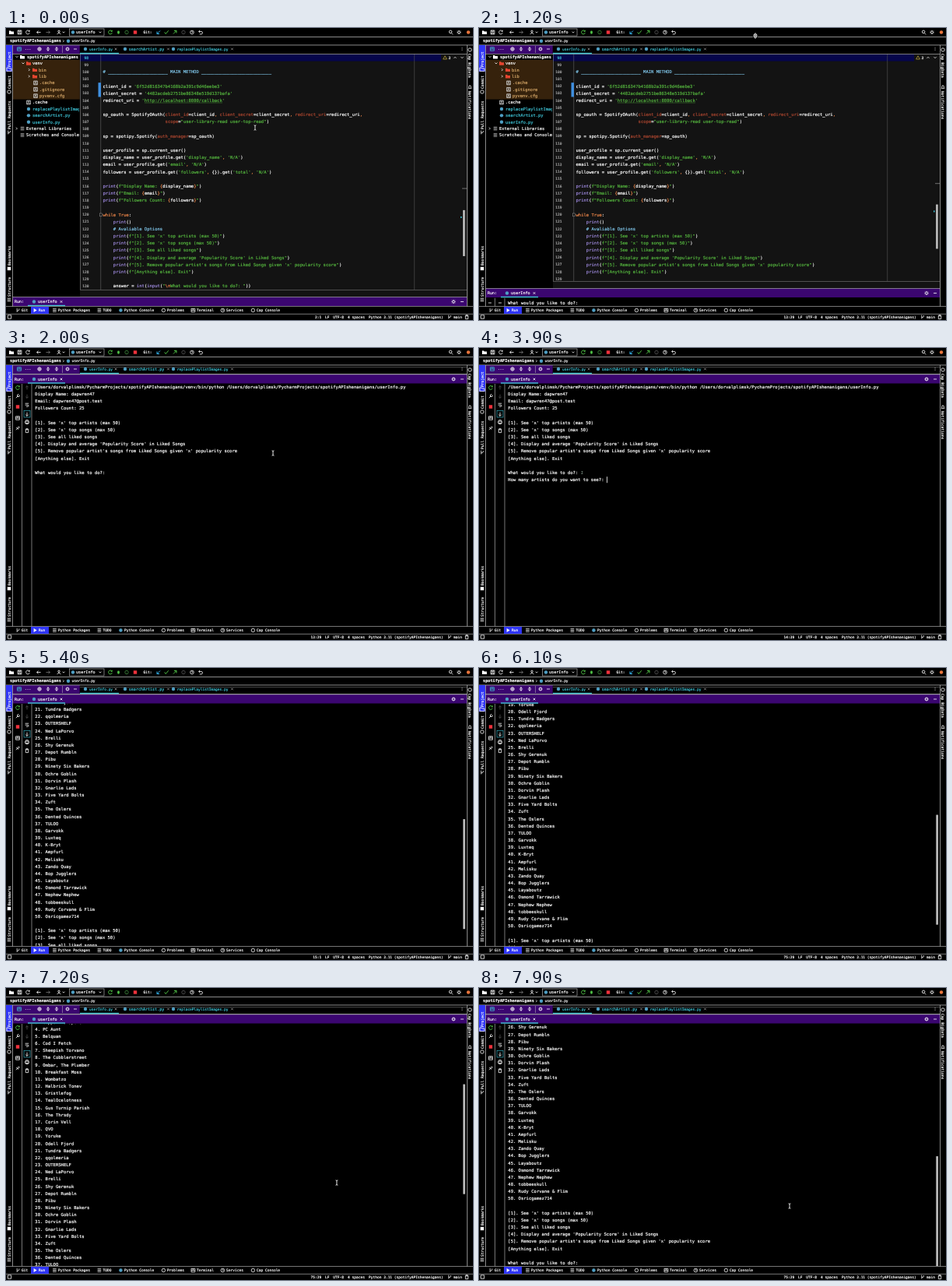
Animation of 600 by 375 pixels, one loop 8000 ms. Source, as an HTML page with a canvas:

```html
<!DOCTYPE html>
<html lang="en">
<head>
<meta charset="utf-8">
<title>Console session</title>
<style>
html, body { margin: 0; height: 100%; overflow: hidden; background: #000; }
canvas { display: block; width: 100vw; height: 100vh; }
</style>
</head>
<body>
<canvas id="stage"></canvas>
<script>
const W = 600, H = 375, LOOP = 8000, ROW = 9.17, CH = 3.336, UI = 2.75;
const WHITE = '#fff', EDGE = '#c4c4c4', CYAN = '#3fc4d6', GREEN = '#4fbf45', RED = '#f0323c', BLUE = '#2f35f5';
const PURPLE = '#3b0670', PAPER = '#131313', STRING = '#54b33e', ORANGE = '#ed864a';
const stage = document.getElementById('stage'), g = stage.getContext('2d');
const scale = Math.max(1, devicePixelRatio || 1);
stage.width = W * scale;
stage.height = H * scale;

const CODE_START = 98;
const CODE = `

# ${'_'.repeat(23)} MAIN METHOD ${'_'.repeat(27)}

client_id = '6f52d816347b4168b2a391c9d46eebe3'
client_secret = '4482acdeb2751be86348e519d137bafa'
redirect_uri = 'http://localhost:8080/callback'

sp_oauth = SpotifyOAuth(client_id=client_id, client_secret=client_secret, redirect_uri=redirect_uri,
                        scope="user-library-read user-top-read")

sp = spotipy.Spotify(auth_manager=sp_oauth)

user_profile = sp.current_user()
display_name = user_profile.get('display_name', 'N/A')
email = user_profile.get('email', 'N/A')
followers = user_profile.get('followers', {}).get('total', 'N/A')

print(f"Display Name: {display_name}")
print(f"Email: {email}")
print(f"Followers Count: {followers}")

while True:
    print()
    # Avaliable Options
    print(f"[1]. See 'x' top artists (max 50)")
    print(f"[2]. See 'x' top songs (max 50)")
    print(f"[3]. See all liked songs")
    print(f"[4]. Display and average 'Popularity Score' in Liked Songs")
    print(f"[5]. Remove popular artist's songs from Liked Songs given 'x' popularity score")
    print(f"[Anything else]. Exit")

    answer = int(input("\\nWhat would you like to do?: "))`.split('\n');

const PROJECT = '/Users/dorvalplimsk/PycharmProjects/spotifyAPIshenanigans';
const ASK = 'What would you like to do?: ', COUNT = 'How many artists do you want to see?: ';
const MENU = ['', "[1]. See 'x' top artists (max 50)", "[2]. See 'x' top songs (max 50)", '[3]. See all liked songs',
  "[4]. Display and average 'Popularity Score' in Liked Songs",
  "[5]. Remove popular artist's songs from Liked Songs given 'x' popularity score", '[Anything else]. Exit', '', ASK];
const INTRO = [`${PROJECT}/venv/bin/python ${PROJECT}/userInfo.py`, 'Display Name: dapwren47',
  'Email: dapwren47@post.test', 'Followers Count: 25', ...MENU];
const ARTISTS = `Paper Sextants|Oblong Harbor|Copper Parapets|PC Aunt|Belquan|Cod I Fetch|Sheepish Torvano|The Cobblerstreet|Ombar, The Plumber|Breakfast Moss|Wombatzo|Halbrick Tonev|Gristlefog|TealOcelotness|Gus Turnip Parish|The Thrsdy|Corin Vell|QVO|Yoruke|Odell Fjord|Tundra Badgers|qqolmeria|OUTERSHELF|Ned LaPorvo|Brelli|Shy Gerenuk|Depot Rumbln|Pibu|Ninety Six Bakers|Ochre Goblin|Dorvin Plash|Gnarlie Lads|Five Yard Bolts|Zuft|The Oslers|Dented Quinces|TULOO|Garvokk|Luxteq|K-Bryt|Ampfurl|Melisku|Zando Quay|Bop Jugglers|Layaboutz|Osmond Tarrawick|Nephew Nephew|tobbeeskull|Rudy Corvane & Flim|Osricgamez714`
  .split('|').map((name, i) => `${i + 1}. ${name}`);

// Times of the session, in ms
const READY = 700, PICK = 3100, PICKED = 3500, FIVE = 4200, ZERO = 4400, SENT = 4900, LISTED = 5400;
const CARET_RESETS = [0, READY, 1400, PICK, PICKED, FIVE, ZERO, SENT, LISTED];
const PANEL = [[1000, 345.5], [1200, 334.5], [1290, 334.5], [1300, 34]];
const SCROLL = [[5400, 327], [5490, 327], [5500, 375.5], [5900, 375.5], [6600, 164], [6900, 130], [7100, 130], [7700, 375.5]];
const MOUSE = [[100, 320, 128], [900, 355, 346], [1000, 355, 346], [1200, 355, 10], [1500, 355, 10],
  [2000, 343, 135], [2400, 360, 150], [2700, 372, 158]];
const MOUSE_BACK = [[7200, 425, 250], [7800, 399, 280]];

function at(keys, t) {
  const n = keys.findIndex(k => k[0] > t);
  if (n === 0) return keys[0].slice(1);
  if (n < 0) return keys[keys.length - 1].slice(1);
  const a = keys[n - 1], b = keys[n], f = (t - a[0]) / (b[0] - a[0]);
  return a.slice(1).map((v, i) => v + (b[i + 1] - v) * f);
}

function box(x, y, w, h, color) {
  g.fillStyle = color;
  g.fillRect(x, y, w, h);
}

// A hairline outline gives the small type a medium weight.
function text(s, x, y, color = WHITE, pitch = UI, style = '') {
  const size = pitch / 0.602;
  g.font = `${style} ${size}px "DejaVu Sans Mono", monospace`;
  g.fillStyle = g.strokeStyle = color;
  g.lineWidth = 0.18;
  g.fillText(s, x, y + size * 0.34);
  g.strokeText(s, x, y + size * 0.34);
}

function turned(s, x, y, angle) {
  g.save();
  g.translate(x, y);
  g.rotate(angle * Math.PI / 2);
  text(s, 0, 0, WHITE, 2.8);
  g.restore();
}

function clipped(x, y, w, h, draw) {
  if (h <= 0) return;
  g.save();
  g.beginPath();
  g.rect(x, y, w, h);
  g.clip();
  draw();
  g.restore();
}

const SHAPES = {
  folder: 'M-3-2h2l1 1h3v3.4h-6z',
  square: 'M-2.2-2.2h4.4v4.4h-4.4z',
  save: 'M-2.4-2.4h4.8v4.8h-4.8zM-1-2.4v1.6h2v-1.6M-1.2 2.4v-1.8h2.4v1.8',
  sync: 'M2-1.4A2.4 2.4 0 1 0 2.3 .7M2.3-2.6v1.5h-1.5',
  left: 'M2.6 0h-5m2-2l-2 2l2 2',
  right: 'M-2.6 0h5m-2-2l2 2l-2 2',
  up: 'M0 2.4v-4.8m-1.8 1.8l1.8-1.8l1.8 1.8',
  down: 'M0-2.4v4.8m-1.8-1.8l1.8 1.8l1.8-1.8',
  upRight: 'M-2 2l4-4m-3 0h3v3',
  downLeft: 'M2-2l-4 4m3 0h-3v-3',
  check: 'M-2.4 0l1.7 2l3.4-4.2',
  undo: 'M-2.2-1h3a1.6 1.6 0 0 1 0 3.4h-2M-.8-2.6l-1.6 1.6l1.6 1.6',
  user: 'M-1.2-1.2a1.2 1.2 0 1 0 2.4 0a1.2 1.2 0 1 0-2.4 0M-2.4 2.6q2.4-3.4 4.8 0',
  play: 'M-1.8-2.4l4 2.4l-4 2.4z',
  ring: 'M-2.2 0a2.2 2.2 0 1 0 4.4 0a2.2 2.2 0 1 0-4.4 0',
  clock: 'M-2.3 0a2.3 2.3 0 1 0 4.6 0a2.3 2.3 0 1 0-4.6 0M0-1.4v1.4h1.2',
  find: 'M-2.2-.6a1.8 1.8 0 1 0 3.6 0a1.8 1.8 0 1 0-3.6 0M.8 1l1.8 1.8',
  gear: 'M-1.5 0a1.5 1.5 0 1 0 3 0a1.5 1.5 0 1 0-3 0M0-2.6v1M0 1.6v1M-2.6 0h1M1.6 0h1M-1.9-1.9l.7.7M1.2 1.2l.7.7M-1.9 1.9l.7-.7M1.2-1.2l.7-.7',
  minus: 'M-2 0h4',
  cross: 'M-1.3-1.3l2.6 2.6m0-2.6l-2.6 2.6',
  list: 'M-2.3-1.8h4.6M-2.3 0h4.6M-2.3 1.8h4.6',
  target: 'M-2.2 0a2.2 2.2 0 1 0 4.4 0a2.2 2.2 0 1 0-4.4 0M-2.2 0h4.4M0-2.2v4.4',
  spread: 'M-2.2 0h4.4M0-2.8v1.8M0 1v1.8M-1.2-2l1.2 1.2l1.2-1.2M-1.2 2l1.2-1.2l1.2 1.2',
  layout: 'M-2.4-2.2h4.8v4.4h-4.8zM-2.4 0h4.8M0-2.2v2.2',
  wrench: 'M-2.2 2.2l2.8-2.8M2.4-1.4a1.5 1.5 0 1 1-1-1',
  pin: 'M-2.2 2.2l2-2M-1.6-.8l2.4 2.4M-.6-.2l2-2l1 1l-2 2z',
  wrap: 'M-2.4-1.8h4.6M-2.4.2h3.4a1 1 0 0 1 0 2h-2',
  print: 'M-2.4-.8h4.8v2.2h-4.8zM-1.4-.8v-1.6h2.8v1.6M-1.4 1.4v1.2h2.8v-1.2',
  trash: 'M-1.7-1.2h3.4v3.8h-3.4zM-2.2-1.8h4.4M-.7-2.5h1.4',
  branch: 'M-1.2-2.4v4.8M1.4-2v1.2q0 1.4-2.4 1.6',
  bug: 'M-1.4-.6a1.4 1.4 0 0 1 2.8 0v1.4a1.4 1.4 0 0 1-2.8 0zM-2.6-.8h5.2M-2.6 1.2h5.2',
  warning: 'M0-2.2l2.4 4.2h-4.8z',
  open: 'M-1-1.4l1.4 1.4l-1.4 1.4',
  shut: 'M-1.5-.8l1.5 1.5l1.5-1.5',
  raise: 'M-1.5.8l1.5-1.5l1.5 1.5',
  dots: 'M0-2v.7M0-.3v.7M0 1.4v.7',
  bell: 'M-2 1.4h4l-.7-1v-1.2a1.3 1.3 0 0 0-2.6 0v1.2z',
  beam: 'M-1.4-3.2q1.4 0 1.4 1v4.4q0 1-1.4 1M1.4-3.2q-1.4 0-1.4 1m0 4.4q0 1 1.4 1',
  resize: 'M0-3.4l2 2.2h-4zM0 3.4l2-2.2h-4zM-2.8 0h5.6',
};
for (const k in SHAPES) SHAPES[k] = new Path2D(SHAPES[k]);

function icon(name, x, y, color = WHITE, fill = false, width = 0.8) {
  g.save();
  g.translate(x, y);
  g.lineWidth = width;
  g.fillStyle = g.strokeStyle = color;
  fill ? g.fill(SHAPES[name]) : g.stroke(SHAPES[name]);
  g.restore();
}
const icons = list => list.forEach(args => icon(...args));
const pyFile = (x, y) => icon('ring', x, y, '#4f9fc4', true);

function toolbar() {
  icons([['folder', 7, 5.5, WHITE, true], ['save', 17.5, 5.5], ['sync', 28, 5.5], ['left', 42, 5.5], ['right', 54, 5.5, '#777'],
    ['user', 68, 5.5], ['shut', 74, 5.5], ['shut', 121, 5.5], ['sync', 134, 5.5, GREEN, false, 1], ['bug', 144.5, 5.5, GREEN, true],
    ['ring', 155, 5.5, '#3d8a3a'], ['square', 166, 5.5, RED, true], ['downLeft', 196, 5.5, '#35b5f0', false, 1],
    ['check', 206, 5.5, GREEN, false, 1], ['upRight', 217, 5.5, GREEN, false, 1], ['ring', 228, 5.5, '#555'],
    ['clock', 239, 5.5], ['undo', 250, 5.5], ['find', 571.5, 5.5], ['gear', 582, 5.5], ['ring', 594, 5.5, '#e8743b', true]]);
  g.strokeStyle = EDGE;
  g.lineWidth = 0.6;
  g.strokeRect(81.5, 1, 44.5, 9);
  pyFile(86, 5.5);
  text('userInfo', 90, 5.5, WHITE, 3.1);
  text('Git:', 176.5, 5.5);
  box(0, 11.3, W, 0.7, EDGE);
  text('spotifyAPIshenanigans', 5, 16.7, WHITE, 3.14, 'bold');
  icon('open', 74, 16.7);
  pyFile(80, 16.7);
  text('userInfo.py', 84.5, 16.7);
}

function tabs() {
  box(8.7, 22, 86, 11, PURPLE);
  box(0, 21.6, W, 0.7, EDGE);
  icons([['layout', 17, 27, CYAN], ['target', 43, 27], ['spread', 54, 27], ['spread', 65, 27], ['gear', 79, 27],
    ['minus', 89, 27], ['dots', 586, 27]]);
  text('...', 24, 26);
  box(72, 23, 0.5, 9, EDGE);
  [['userInfo.py', 102, 107, 141, UI], ['searchArtist.py', 153, 157.8, 208.5, 3.04], ['replacePlaylistImages.py', 215, 219.7, 290.5, UI]]
    .forEach(([name, ix, x, close, pitch]) => {
      pyFile(ix, 27);
      text(name, x, 27, CYAN, pitch);
      icon('cross', close, 27, '#bbb', false, 0.6);
    });
  box(8, 33, 584, 0.6, EDGE);
  box(95, 31.8, 50, 1.5, CYAN);
}

function stripes() {
  box(0, 22, 8, 34, BLUE);
  box(8, 22, 0.7, 336, EDGE);
  box(592, 22, 0.7, 336, EDGE);
  [['Project', 50, 'folder', 53], ['Commit', 78, 'ring', 82], ['Pull Requests', 130, 'branch', 134],
    ['Bookmarks', 305, 'square', 309], ['Structure', 345, 'list', 349]].forEach(([s, y, shape, iy]) => {
    turned(s, 4, y, -1);
    icon(shape, 4, iy, WHITE, shape === 'square');
  });
  icon('ring', 596, 28);
  turned('Cap BigData', 596, 33, 1);
  icon('bell', 596, 76);
  turned('Notifications', 596, 81, 1);
}

function tree() {
  box(8.7, 41, 86, 50.6, '#36220c');
  icon('shut', 14, 37);
  icon('folder', 21, 37, WHITE, true);
  text('spotifyAPIshenanigans', 27, 37, WHITE, 3.14, 'bold');
  [['venv', 34, 'folder', 'shut'], ['bin', 42, 'folder', 'open'], ['lib', 42, 'folder', 'open'], ['.cache', 43, 'save'],
    ['.gitignore', 43, 'save'], ['pyvenv.cfg', 43, 'save'], ['.cache', 34, 'save'], ['replacePlaylistImages.py', 34],
    ['searchArtist.py', 34], ['userInfo.py', 34], ['External Libraries', 26, 'list', 'open'], ['Scratches and Consoles', 26, 'list']]
    .forEach(([name, x, shape, arrow], i) => {
      const y = 45.3 + i * 8.38, isFolder = shape === 'folder';
      if (shape) icon(shape, x - 5, y, isFolder ? '#e5452f' : '#d0d0d0', isFolder);
      else pyFile(x - 5, y);
      if (arrow) icon(arrow, x - 12, y);
      const color = !shape ? CYAN : x > 40 ? '#d3a566' : WHITE;
      clipped(x, y - 5, 94 - x, 10, () => text(name, x, y, color, 3.25));
    });
}

const TOKEN = /#.*|f?"[^"]*"|'[^']*'|\b(?:while|True)\b|\b(?:print|int|input)\b|\w+(?==)|\w+|[^\w]/g;
function colorOf(token) {
  if (token[0] === '#') return '#7ec3e6';
  if (/["']/.test(token)) return STRING;
  if (/^(while|True|,)$/.test(token)) return ORANGE;
  return /^(print|int|input)$/.test(token) ? '#9a86d8' : WHITE;
}

function codeLine(line, y) {
  let x = 124.5;
  const put = (s, color) => { text(s, x, y, color, CH); x += s.length * CH; };
  for (const { 0: token, index } of line.matchAll(TOKEN)) {
    const start = x;
    if (token.includes('"')) {
      for (const part of token.split(/([{}]|\\n)/)) {
        const name = /^(display_name|email|followers)$/.test(part);
        put(part, /^([{}]|\\n)$/.test(part) ? ORANGE : name ? WHITE : STRING);
      }
    } else put(token, /^\w+$/.test(token) && line[index + token.length] === '=' ? '#a8452f' : colorOf(token));
    if (token.includes('http')) box(start + CH, y + 2.8, x - start - 2 * CH, 0.4, STRING);
  }
}

function editor(bottom) {
  box(95, 33.6, 497, 320, PAPER);
  clipped(95, 33.6, 497, bottom - 33.6, () => {
    box(95, 33.6, 464, 9, '#06064a');
    box(94.8, 33, 0.6, 330, EDGE);
    box(121.6, 33, 0.5, 330, '#777');
    box(524.5, 33, 0.6, 330, '#555');
    box(118.5, 70.2, 3.5, 18.3, '#3f8fe0');
    CODE.forEach((line, i) => {
      const y = 38 + i * ROW, n = String(CODE_START + i);
      text(n, 106 - n.length * UI + (n.length > 2 ? 0.5 : 0), y, i ? '#a8a8a8' : CYAN);
      codeLine(line, y);
    });
    box(120.3, 238, 3.4, 3.8, PAPER);
    g.strokeStyle = '#999';
    g.lineWidth = 0.5;
    g.strokeRect(120.3, 238, 3.4, 3.8);
    icon('warning', 564, 38, '#e6c84a', false, 0.6);
    text('3', 568.5, 38);
    icons([['raise', 577, 38], ['shut', 586, 38]]);
    const h = bottom - 33;
    box(587, 33 + h * 0.663, 2.8, h * 0.195, '#b5b5b5');
    box(586, 33 + h * 0.57, 6, 0.7, '#999');
    box(584, 33 + h * 0.69, 1.5, 2, CYAN);
  });
  box(95, bottom, 497, 0.6, '#777');
}

function consoleLines(t) {
  const lines = t < READY ? INTRO.slice(0, 2) : INTRO.slice();
  if (t >= PICKED) lines.push(COUNT);
  if (t >= SENT) lines.push('');
  if (t >= LISTED) lines.push('', ...ARTISTS, ...MENU);
  return lines;
}

function runPanel(t, top) {
  box(8.7, top, 583.3, 358 - top, '#000');
  box(8.7, top, 583.3, 11.5, PURPLE);
  box(8.7, top - 0.4, 583.3, 0.6, EDGE);
  box(28, top + 10.3, 48, 1.4, CYAN);
  text('Run:', 11, top + 6, WHITE, 3);
  pyFile(36, top + 6);
  text('userInfo', 41, top + 6, WHITE, 3.1);
  icons([['cross', 71, top + 6], ['gear', 575, top + 6], ['minus', 586, top + 6]]);

  const body = top + 12, typed = t < PICK ? '' : '1';
  const amount = t < FIVE ? '' : t < ZERO ? '5' : '50';
  const lines = consoleLines(t), last = lines.length - 1;
  const tail = Math.max(0, top + 16 + last * ROW - 353);
  const scroll = t >= LISTED ? at(SCROLL, t)[0] : tail;
  clipped(8.7, body, 583, 357.5 - body, () => {
    box(20.3, body, 0.6, 330, EDGE);
    box(32.7, body, 0.6, 330, EDGE);
    if (top > 250) icons([['minus', 14, 353], ['minus', 27, 353]]);
    else {
      const d = top - 34;
      g.strokeStyle = CYAN;
      g.lineWidth = 0.6;
      g.strokeRect(23, 80.5 + d, 8, 8.5);
      icons([['sync', 15, 51 + d, GREEN, false, 1], ['wrench', 15, 62 + d], ['square', 15, 75.5 + d, RED, true],
        ['layout', 15, 90 + d], ['pin', 15, 103 + d], ['up', 27, 51 + d, '#555'], ['down', 27, 62 + d, '#555'],
        ['wrap', 27, 73 + d], ['down', 27, 85 + d], ['print', 27, 95 + d], ['trash', 27, 106 + d]]);
    }
    const input = { 12: typed, 13: amount };
    lines.forEach((line, i) => {
      const y = top + 16 + i * ROW - scroll;
      if (y < body - 6 || y > 364) return;
      text(line, 37.3, y, WHITE, CH);
      const entry = input[i] || '', end = 37.3 + line.length * CH;
      text(entry, end, y, '#74867a', CH, 'italic');
      const reset = CARET_RESETS.filter(r => r <= t).pop();
      if (i === last && t >= READY && (t - reset) % 1000 < 500) box(end + entry.length * CH, y - 4, 0.8, 8, WHITE);
    });
    if (t >= LISTED) {
      const view = 357.5 - body, total = 75 * ROW;
      box(587.2, body + scroll / total * view, 2.8, view * view / total, '#b5b5b5');
    }
  });
}

function caretLabel(t) {
  if (t < READY) return '2:1';
  if (t < PICKED) return t < PICK ? '13:29' : '13:30';
  if (t < SENT) return t < FIVE ? '14:39' : t < ZERO ? '14:40' : '14:41';
  return t < LISTED + 90 ? '15:1' : '75:29';
}

function footer(t) {
  box(0, 357.5, W, 17.5, '#000');
  box(0, 357.3, W, 0.6, EDGE);
  box(0, 366.9, W, 0.6, EDGE);
  box(32, 358, 23, 9, BLUE);
  [['Git', 20, 'branch'], ['Run', 42, 'play'], ['Python Packages', 67, 'list'], ['TODO', 124.5, 'list'], ['Python Console', 152, ''],
    ['Problems', 207, 'ring'], ['Terminal', 245, 'layout'], ['Services', 283, 'clock'], ['Cap Console', 322, 'ring']]
    .forEach(([s, x, shape]) => {
      shape ? icon(shape, x - 4.6, 362.5, WHITE, shape === 'play') : pyFile(x - 4.6, 362.5);
      text(s, x, 362.5);
    });
  const place = caretLabel(t);
  icon('square', 4.5, 371);
  text(place, 405.3 - place.length * UI, 371);
  [['LF', 410], ['UTF-8', 420.3], ['4 spaces', 439], ['Python 3.11 (spotifyAPIshenanigans)', 466], ['main', 575]]
    .forEach(([s, x]) => text(s, x, 371));
  icons([['branch', 570, 371], ['trash', 592, 371]]);
}

function pointer(t) {
  if (t >= 2900 && t < 7200) return;
  const [x, y] = at(t < 2900 ? MOUSE : MOUSE_BACK, t);
  const shape = t >= 900 && t < 1550 ? 'resize' : 'beam';
  icon(shape, x, y, '#000', false, 2);
  icon(shape, x, y, WHITE, false, 0.9);
}

function draw(t) {
  const [top] = at(PANEL, t);
  g.setTransform(stage.width / W, 0, 0, stage.height / H, 0, 0);
  box(0, 0, W, H, '#000');
  toolbar();
  tree();
  editor(top - 9.5);
  tabs();
  runPanel(t, top);
  stripes();
  footer(t);
  pointer(t);
}

function tick() {
  draw(performance.now() % LOOP);
  requestAnimationFrame(tick);
}
tick();
</script>
</body>
</html>
```
